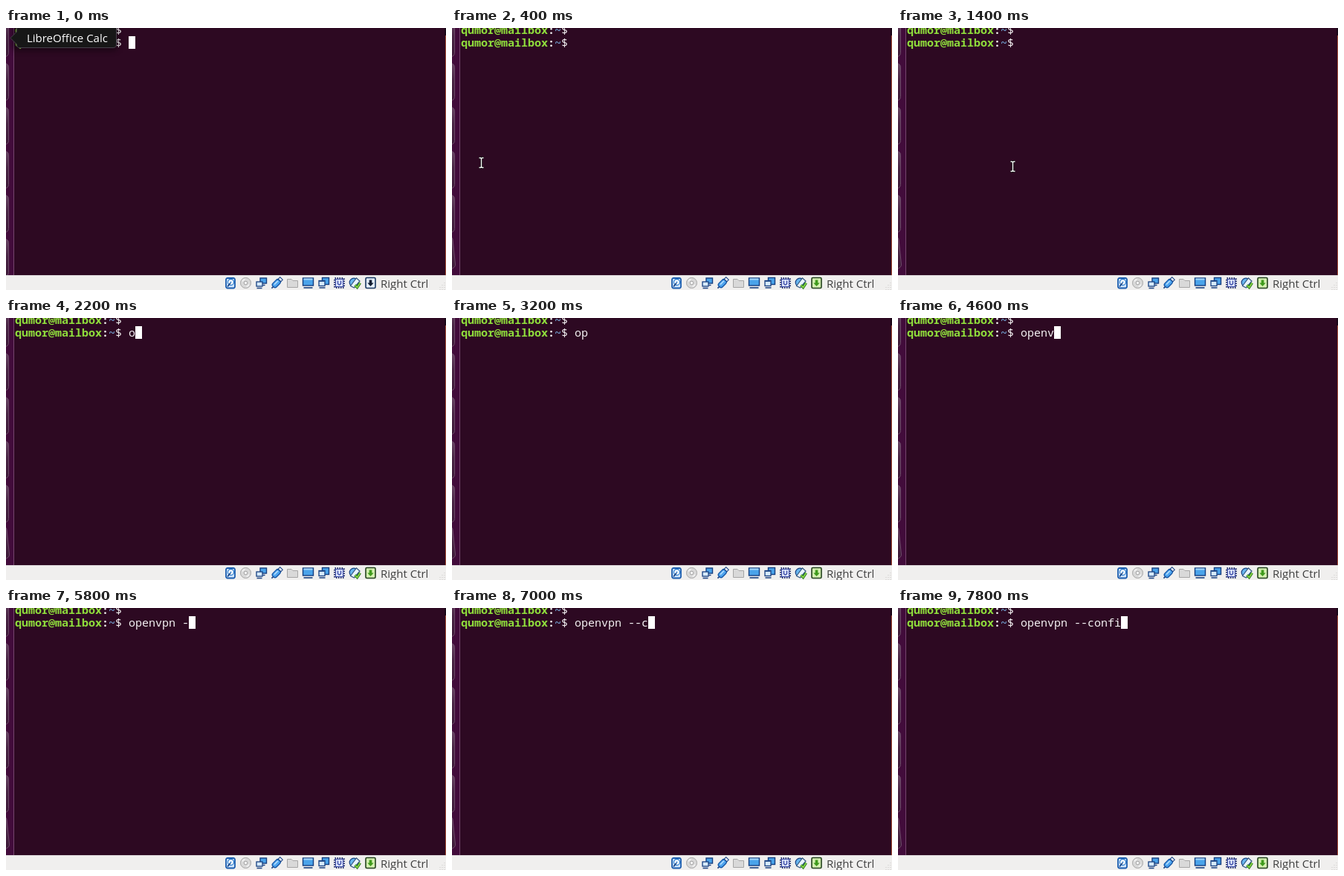
An HTML page that plays this animation: 592 px wide and 352 px high, repeating every 8000 ms.

```html
<!DOCTYPE html>
<html lang="en">
<head>
<meta charset="utf-8">
<title>Terminal typing</title>
<style>
  html, body { margin: 0; width: 100%; height: 100%; overflow: hidden; background: #2d0922; }
  svg { display: block; width: 592px; height: 352px; }
  text { white-space: pre; }
  .term { font: 500 15px "Noto Sans Mono", monospace; fill: #f4f2f3; }
  .user, .path, .sep { font-weight: 700; }
  .user { fill: #8fdd3c; }
  .path { fill: #729fcf; }
  .ui { font: 15px "Open Sans", sans-serif; }
  .tile { fill: url(#tile); stroke: #6d4a69; }
  .box { fill: #cfe4fb; stroke: #1a5cae; stroke-width: 1.8; }
  .screen { fill: #4aa3ea; stroke: #163f80; stroke-width: 1.4; }
  .pane { fill: #d6eafc; stroke: #163f80; stroke-width: 1.3; }
  .dark { fill: none; stroke: #163f80; stroke-width: 1.6; }
  .grey { fill: #d9d9d9; stroke: #a6a6a6; }
</style>
</head>
<body>
<svg viewBox="0 0 592 352">
  <defs>
    <linearGradient id="tile" x2="0" y2="1">
      <stop offset="0" stop-color="#6a4665"/>
      <stop offset=".45" stop-color="#492544"/>
      <stop offset="1" stop-color="#3c1837"/>
    </linearGradient>
    <filter id="soft" x="-20%" y="-60%" width="140%" height="220%">
      <feGaussianBlur stdDeviation="4"/>
    </filter>
    <rect id="slot" class="tile" x="-40" y=".5" width="43.5" height="50" rx="5"/>
    <text id="prompt" class="term" x="12"><tspan class="user">qumor@mailbox</tspan><tspan class="sep">:</tspan><tspan class="path">~</tspan>$</text>
    <path id="ibeam" d="M-3-6.500H-1L0-5.500L1-6.500H3M0-5.500V5.500M-3 6.500H-1L0 5.500L1 6.500H3"/>
  </defs>

  <rect width="592" height="352" fill="#2d0922"/>

  <!-- launcher -->
  <rect width="10" height="332" fill="#420c3b"/>
  <rect x="10" width="1" height="332" fill="#75456c"/>
  <use href="#slot" y="-12"/>
  <use href="#slot" y="47"/>
  <use href="#slot" y="106"/>
  <use href="#slot" y="165"/>
  <use href="#slot" y="224"/>
  <use href="#slot" y="283" id="flat"/>
  <path id="folded" class="tile" d="M-2 280.500Q.5 281 1 284L4.500 318Q4.500 322-2 324Z"/>

  <!-- window edge -->
  <rect x="590" width="2" height="10" fill="#1a0718"/>
  <rect x="591" y="10" width="1" height="322" fill="#a34a35"/>

  <!-- shell -->
  <use href="#prompt" y="8"/>
  <use href="#prompt" y="25"/>
  <text id="typed" class="term" x="165" y="25"></text>
  <rect id="caret" y="11" width="9" height="17" fill="#fff"/>

  <g id="tip">
    <rect x="8" y="-4" width="142" height="34" rx="5" fill="#000" opacity=".45" filter="url(#soft)"/>
    <path d="M6 13.500L14.500 5V-5H144.500Q148.500-5 148.500 0V22Q148.500 26.500 144 26.500H18Q14.500 26.500 14.500 22Z"
          fill="#171717" stroke="#46404a"/>
    <text class="ui" x="28" y="19" fill="#fff">LibreOffice Calc</text>
  </g>

  <g id="beam" fill="none">
    <use href="#ibeam" stroke="#000" stroke-width="2.800"/>
    <use href="#ibeam" stroke="#fff" stroke-width="1.400"/>
  </g>

  <!-- status bar -->
  <rect y="332" width="592" height="20" fill="#f0efee"/>
  <rect y="332" width="592" height="1" fill="#dcd8da"/>
  <g transform="translate(302 342.500)">
    <rect class="box" x="-6" y="-6.500" width="12" height="13.500" rx="2"/>
    <circle cx=".5" cy="-1" r="4" fill="#fff" stroke="#2f7fd0" stroke-width="1.300"/>
    <circle cx=".5" cy="-1" r="1" fill="#2f7fd0"/>
    <path class="dark" d="M-4 5L0 0"/>
  </g>
  <g transform="translate(322.500 342.500)">
    <circle class="grey" r="7"/>
    <path d="M-4.500-2A5 5 0 0 1-1-5M4.500 2A5 5 0 0 1 1 5" fill="none" stroke="#f6f6f6" stroke-width="1.500"/>
    <circle r="2.300" fill="#f6f6f6" stroke="#a0a0a0"/>
  </g>
  <g transform="translate(343.500 342.500)">
    <rect class="screen" x="-1.500" y="-6.500" width="8.500" height="7"/>
    <rect class="pane" x="-6.500" y="-1.500" width="8" height="6"/>
    <path class="dark" d="M2 3H5M-6 7H1"/>
  </g>
  <g transform="translate(364.500 342.500) rotate(-45)">
    <rect x="-7" y="-3.500" width="12" height="7" rx="3" fill="#4ea5ee" stroke="#1756a5" stroke-width="1.300"/>
    <path d="M-4-1H3" stroke="#b9defb" stroke-width="1.500"/>
    <rect x="5" y="-2.500" width="3.500" height="5" fill="#eef6ff" stroke="#163f80"/>
    <path class="dark" d="M-10 0H-7"/>
  </g>
  <path class="grey" d="M378.500 348.500V337.500H384L386 339.500H392.500V348.500Z"/>
  <g transform="translate(406.500 342.500)">
    <rect class="screen" x="-7" y="-6.500" width="14" height="10"/>
    <path d="M-6-5H6" stroke="#a6d6fa" stroke-width="2"/>
    <path class="dark" d="M-6 6.500H6"/>
  </g>
  <g transform="translate(427.500 342.500)">
    <rect class="screen" x="-2" y="-7" width="9" height="9"/>
    <rect class="pane" x="-6.500" y="-3" width="8" height="7"/>
    <path class="dark" d="M-6-2.500H1M-6 6.500H2"/>
  </g>
  <g transform="translate(448.500 342.500)">
    <rect x="-6" y="-6" width="12" height="12" fill="none" stroke="#24306e" stroke-width="3" stroke-dasharray="1.500 1.500"/>
    <rect x="-5" y="-5" width="10" height="10" fill="#dfe6fd" stroke="#3a4aa6"/>
    <path d="M-2-3V1Q0 4 2 1V-3" fill="none" stroke="#3a4aa6" stroke-width="1.400"/>
  </g>
  <g transform="translate(469.500 342.500)">
    <circle cx="-1.500" cy="-.5" r="5.800" fill="#69b6ef" stroke="#163f80" stroke-width="1.200"/>
    <path d="M-6 4L2-6.500L6.500-2.500L-1 6.500Z" fill="#e8f4ff" stroke="#35587f" stroke-width="1.200"/>
    <path d="M0 3L3 6L7 0" fill="none" stroke="#2a7a1c" stroke-width="3.400"/>
    <path d="M0 3L3 6L7 0" fill="none" stroke="#8fdc4a" stroke-width="1.500"/>
  </g>
  <g transform="translate(490.500 342.500)">
    <rect id="key" x="-6.500" y="-7" width="13" height="14" rx="1.500" stroke-width="1.600"/>
    <path id="arrow" d="M-1.800-4H1.800V0H4.200L0 4.500L-4.200 0H-1.800Z"/>
  </g>
  <text class="ui" x="504" y="349" fill="#3f3f3f">Right Ctrl</text>
  <path d="M590 342V352M587 345V352M584 348V352" stroke="#c9c7c5" stroke-dasharray="1 2"/>
</svg>

<script>
  const LOOP = 8000, STEP = 200, CHAR = 9, LEFT = 165;
  const LINE = "openvpn --confi";
  // when each character of LINE appears
  const KEYS = [2200, 2600, 3600, 4000, 4600, 4800, 5200, 5400, 5800, 6400,
                7000, 7200, 7400, 7600, 7800];
  // caret hidden between these times
  const BLINKS = [[200, 800], [1400, 2000], [3200, 3600]];
  // pointer: time, x, y
  const MOVES = [[400, 39, 181], [600, 84, 183], [800, 126, 185], [1000, 154, 186], [1600, 156, 186]];

  const el = id => document.getElementById(id);
  const show = (id, on) => el(id).setAttribute("visibility", on ? "visible" : "hidden");
  const paint = (id, attrs) => {
    for (const name in attrs) el(id).setAttribute(name, attrs[name]);
  };

  function draw(now) {
    const t = Math.floor((now % LOOP) / STEP) * STEP;
    const count = KEYS.filter(k => k <= t).length;
    el("typed").textContent = LINE.slice(0, count);
    el("caret").setAttribute("x", LEFT + CHAR * count);
    show("caret", !BLINKS.some(([a, b]) => t >= a && t < b));

    const captured = t >= 200;
    show("tip", !captured);
    show("flat", !captured);
    show("folded", captured);
    paint("key", captured ? { fill: "#d3efb0", stroke: "#23421c" } : { fill: "#e3eefb", stroke: "#17365f" });
    paint("arrow", { fill: captured ? "#3f9a1c" : "#101c30" });

    const spot = MOVES.filter(m => m[0] <= t).pop();
    show("beam", spot && t < KEYS[0]);
    if (spot) el("beam").setAttribute("transform", `translate(${spot[1] + .5} ${spot[2]})`);
  }

  const start = performance.now();
  function tick() {
    draw(performance.now() - start);
    requestAnimationFrame(tick);
  }
  tick();
</script>
</body>
</html>
```
